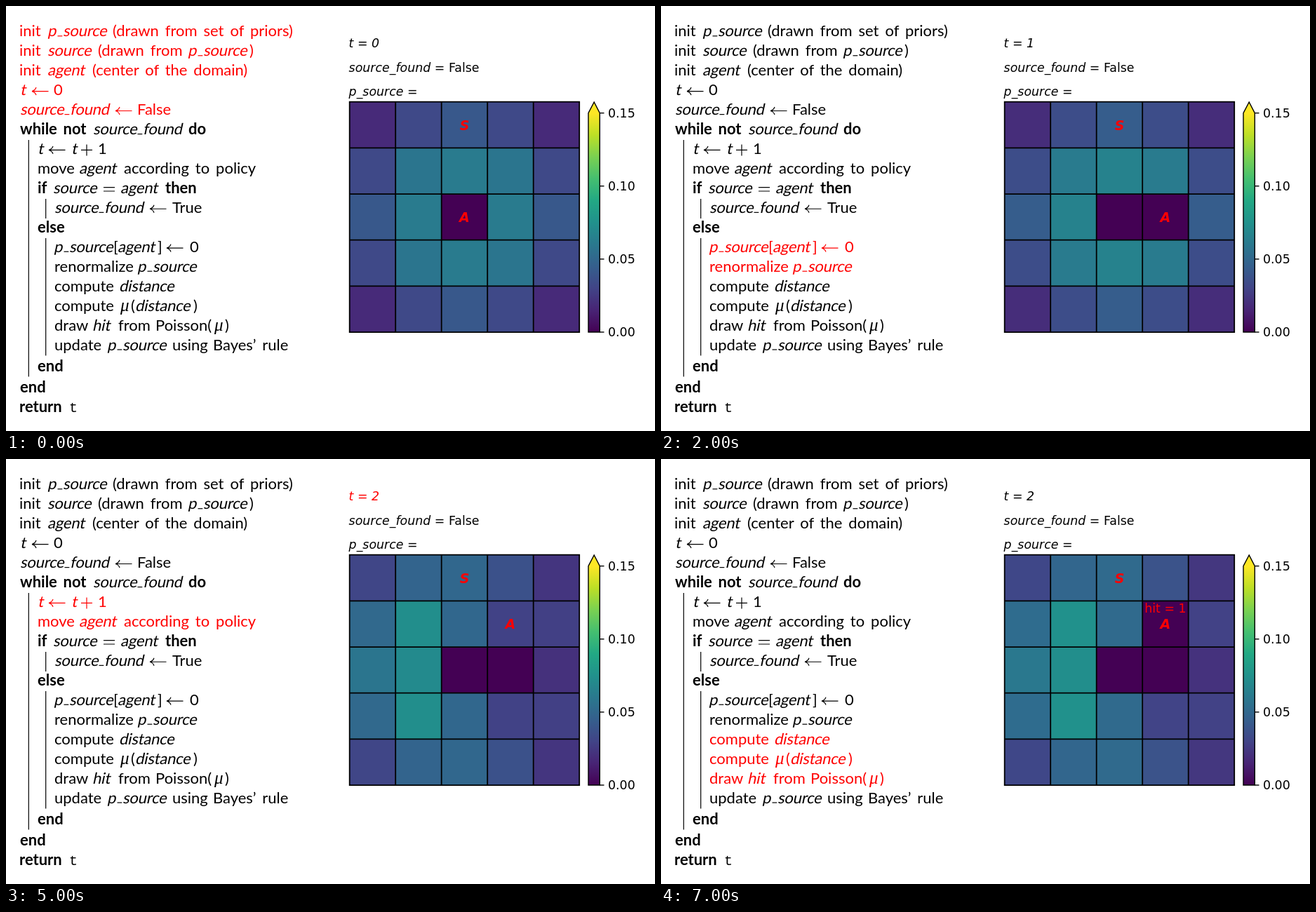
Animation of 925 by 606 pixels, one loop 8000 ms. Source, as an HTML page:

```html
<!DOCTYPE html>
<html lang="en">
<head>
<meta charset="utf-8">
<title>Source search algorithm</title>
<style>
  html, body { margin: 0; width: 100%; height: 100%; overflow: hidden; background: #fff; }
  svg { display: block; }
  .code { font: 22px Lato, sans-serif; word-spacing: 3.3px; }
  .code .b { font-weight: 700; }
  .code .slant { letter-spacing: -.2px; }
  .code .mu { font: italic 25px "Liberation Serif", serif; }
  .code .tt { font: 20px "Liberation Mono", monospace; }
  .code path { fill: none; stroke: currentColor; stroke-width: 1.2; }
  .code g { fill: currentColor; }
  .plot { font: 17.4px "DejaVu Sans", sans-serif; }
  .i { font-style: oblique; }
  .mark { font-size: 19px; font-weight: 700; font-style: oblique; }
  .mark, .hit { fill: #f00; text-anchor: middle; }
  .line { fill: none; stroke: #000; stroke-width: 1.8; }
  .thin { stroke-width: 1.4; }
  .on { color: #f00; fill: #f00; }
</style>
</head>
<body>
<svg width="925" height="606" viewBox="0 0 925 606">
  <defs><linearGradient id="viridis" x1="0" y1="1" x2="0" y2="0"></linearGradient></defs>
  <g class="code" id="code">
    <path d="M32.3 191V528.5M56.7 275V303M56.7 331V498.5"/>
  </g>
  <g class="plot" id="plot">
    <text id="time" class="i" x="488.6" y="59"></text>
    <text x="488.6" y="93.7"><tspan class="i">source_found</tspan> = False</text>
    <text class="i" x="488.6" y="128.4">p_source =</text>
    <g id="cells"></g>
    <path class="line" id="grid"/>
    <text class="mark" x="653.5" y="176.8">S</text>
    <text class="mark" id="agent">A</text>
    <text class="hit" id="hit"></text>
    <path fill="url(#viridis)" d="M830 152.6H846.3V465H830Z"/>
    <path fill="#fde725" d="M830 153L838.2 137L846.3 153Z"/>
    <path class="line thin" d="M830 152.6L838.2 137L846.3 152.6V465H830Z"/>
  </g>
</svg>
<script>
const $ = id => document.getElementById(id);
function add(parent, tag, attrs, text) {
  const el = document.createElementNS('http://www.w3.org/2000/svg', tag);
  for (const k in attrs) el.setAttribute(k, attrs[k]);
  if (text) el.textContent = text;
  return parent.appendChild(el);
}

// Pseudocode. Run prefixes: "/" slanted, "*" bold, "`" monospace.
const symbols = {
  '←': 'M0 0H23.5M0 0C3 -.8 5.2 -3 6 -5.5M0 0C3 .8 5.2 3 6 5.5',
  '=': 'M0 -2.7H16M0 2.7H16',
  '+': 'M0 0H16M8 -8V8'
};
const lines = [
  ['init', 20, 'init', 61, '/p_source', 152, '(drawn from set of priors)'],
  ['init', 20, 'init', 60, '/source', 131, '(drawn from', 261, '/p_source', 347, ')'],
  ['init', 20, 'init', 60, '/agent', 123, '(center of the domain)'],
  ['init', 21, '/t', 37, '←', 68, '0'],
  ['init', 21, '/source_found', 156, '←', 189, 'False'],
  ['', 20, '*while not', 125, '/source_found', 260, '*do'],
  ['move', 46, '/t', 61, '←', 94, '/t', 107, '+', 132, '1'],
  ['move', 46, 'move', 105, '/agent', 168, 'according to policy'],
  ['', 46, '*if', 68, '/source', 139, '=', 164, '/agent', 227, '*then'],
  ['', 70, '/source_found', 205, '←', 237, 'True'],
  ['', 45, '*else'],
  ['zero', 70, '/p_source', 155, '[', 160, '/agent', 216, ']', 229, '←', 262, '0'],
  ['zero', 70, 'renormalize', 189, '/p_source'],
  ['draw', 69, 'compute', 162, '/distance'],
  ['draw', 69, 'compute', 162, 'μ', 178, '(', 185, '/distance', 267, ')'],
  ['draw', 69, 'draw', 125, '/hit', 160, 'from', 215, 'Poisson(', 296, 'μ', 312, ')'],
  ['update', 70, 'update', 146, '/p_source', 238, 'using', 297, 'Bayes’ rule'],
  ['', 45, '*end'],
  ['', 20, '*end'],
  ['', 20, '*return', 91, '`t']
];
const tail = { 17: 520.7, 18: 551.3, 19: 579.3 };
const pen = document.createElement('canvas').getContext('2d');

// x is where the ink of the run begins
function run(g, x, y, s) {
  if (symbols[s]) return add(g, 'path', { d: symbols[s], transform: `translate(${x} ${y - 5.6})` });
  const kind = { '/': 'slant', '*': 'b', '`': 'tt' }[s[0]] || (s === 'μ' ? 'mu' : '');
  if ('/*`'.includes(s[0])) s = s.slice(1);
  const [head, rest] = s.split('_');
  if (rest) {
    const step = head === 'p' ? 21 : 71;
    add(g, 'path', { d: `M${x + step - 8.5} ${y - .5}h6.8` });
    run(g, x + step, y, '/' + rest);
  }
  const el = add(g, 'text', { class: kind }, head);
  pen.font = getComputedStyle(el).font;
  const left = x + pen.measureText(head).actualBoundingBoxLeft;
  el.setAttribute('transform', kind === 'slant'
    ? `translate(${left - 1} ${y}) skewX(-12)` : `translate(${left} ${y})`);
}

const groups = lines.map(([name, ...runs], k) => {
  const g = add($('code'), 'g');
  const y = tail[k] || 43.3 + 27.95 * k;
  for (let i = 0; i < runs.length; i += 2) run(g, runs[i], y, runs[i + 1]);
  return { g, name };
});

// Colour scale
const stops = '440154 482475 414487 355f8d 2a788e 21918c 22a884 44bf70 7ad151 bddf26 fde725'
  .split(' ').map(h => [0, 2, 4].map(i => parseInt(h.slice(i, i + 2), 16)));
function color(p) {
  const u = Math.min(p / .15, .9999) * 10, i = Math.floor(u);
  return `rgb(${stops[i].map((c, k) => Math.round(c + (stops[i + 1][k] - c) * (u - i)))})`;
}
stops.forEach((c, i) => add($('viridis'), 'stop', { offset: i / 10, 'stop-color': `rgb(${c})` }));
for (let i = 0; i < 4; i++) {
  const y = 465 - i * 104.13;
  add($('plot'), 'path', { class: 'line thin', d: `M846.3 ${y}h6.2` });
  add($('plot'), 'text', { x: 858, y: y + 6.4 }, (i * .05).toFixed(2));
}

// Probability maps; rows mirror about the middle one
const X = 489.7, Y = 136.7, W = 65.5, H = 65.67;
const cells = [];
let grid = '';
for (let i = 0; i < 25; i++)
  cells.push(add($('cells'), 'rect', { x: X + i % 5 * W, y: Y + Math.floor(i / 5) * H, width: W, height: H }));
for (let i = 0; i < 6; i++)
  grid += `M${X + i * W} ${Y - .9}v${5 * H + 1.8}M${X - .9} ${Y + i * H}h${5 * W + 1.8}`;
$('grid').setAttribute('d', grid);

const mirror = rows => [0, 1, 2, 1, 0].flatMap(r => rows[r]);
const without = (map, cell) => map.map((p, i) => i === cell ? 0 : p / (1 - map[cell]));
const prior = mirror([
  [.018, .033, .041, .033, .018],
  [.033, .058, .062, .058, .033],
  [.041, .062, 0, .062, .041]
]);
const posterior = mirror([
  [.031, .048, .050, .037, .023],
  [.051, .073, .050, .029, .028],
  [.058, .071, 0, 0, .021]
]);
const prior1 = without(prior, 13), posterior1 = without(posterior, 8);

// One step per second: highlighted lines, t, agent cell, map, hit
const steps = [
  ['init', 0, 12, prior],
  ['move', 1, 13, prior],
  ['zero', 1, 13, prior1],
  ['draw', 1, 13, prior1, 0],
  ['update', 1, 13, posterior, 0],
  ['move', 2, 8, posterior],
  ['zero', 2, 8, posterior1],
  ['draw', 2, 8, posterior1, 1]
];

function show([name, t, at, map, hit]) {
  for (const l of groups) l.g.classList.toggle('on', l.name === name);
  $('time').textContent = 't = ' + t;
  $('time').classList.toggle('on', name === 'move');
  cells.forEach((c, i) => c.setAttribute('fill', color(map[i])));
  const x = X + (at % 5 + .5) * W, y = Y + Math.floor(at / 5) * H;
  const place = (el, dy) => { el.setAttribute('x', x); el.setAttribute('y', y + dy); };
  place($('agent'), 40);
  place($('hit'), 16.7);
  $('hit').textContent = hit === undefined ? '' : 'hit = ' + hit;
}

let current = -1;
function tick() {
  const k = Math.floor(performance.now() / 1000) % steps.length;
  if (k !== current) show(steps[current = k]);
  requestAnimationFrame(tick);
}
tick();
</script>
</body>
</html>
```
